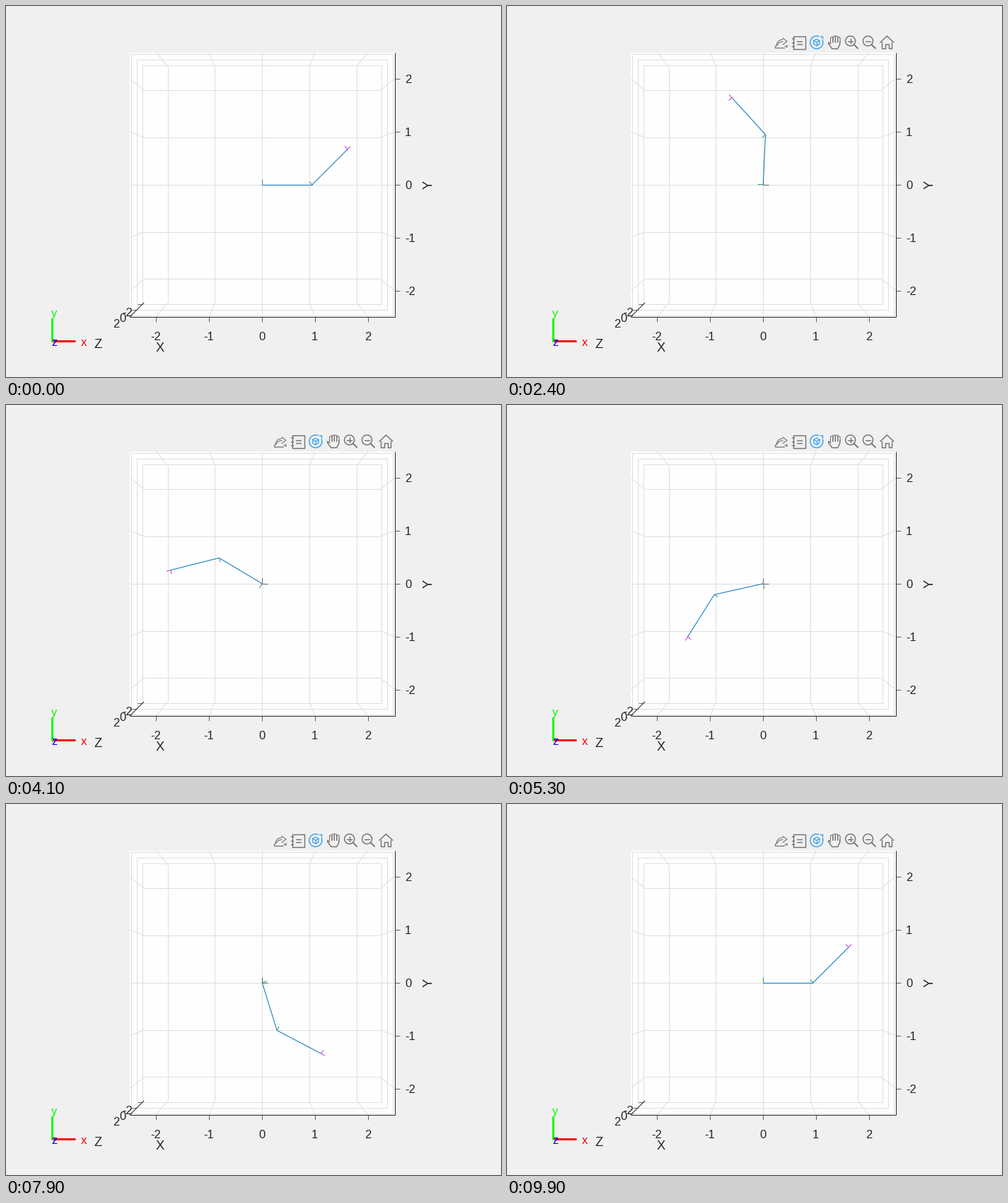
Recreate the animation shown at these times as a matplotlib script. Size 700 px wide and 525 px high, loop 10000 ms.

```python
import numpy as np
import matplotlib.pyplot as plt
from matplotlib.animation import FuncAnimation
from matplotlib.patches import Rectangle

W, H, DPI = 700, 525, 100
FRAMES, INTERVAL = 100, 100
TOOLBAR_START = 17

INK, GRID, BLUE = "#262626", "#dedede", "#0072bd"
GREY, ACTIVE = "#707070", "#2f9ff0"
LEFT, RIGHT, TOP, BOTTOM = 175, 550, 66, 440
CX, CY = 362.2, 252.8
UNIT = 75       # pixels per unit on the front face
LINK = 70.8     # pixels per unit at z = 0
EDGE = 2.5
TICKS = range(-2, 3)

plt.rcParams["font.family"] = "Liberation Sans"
fig = plt.figure(figsize=(W / DPI, H / DPI), dpi=DPI, facecolor="#f0f0f0")
ax = fig.add_axes([0, 0, 1, 1])
ax.set_xlim(0, W)
ax.set_ylim(H, 0)
ax.axis("off")


def line(*pts, color=INK, width=1.0, z=2, cap="butt"):
    xs, ys = zip(*pts)
    return ax.plot(xs, ys, color=color, lw=width * 72 / DPI, zorder=z,
                   solid_capstyle=cap, solid_joinstyle="round")[0]


def label(x, y, s, size=12, color=INK, ha="center", rotation=0):
    ax.text(x, y, s, fontsize=size, color=color, ha=ha, va="baseline",
            rotation=rotation, rotation_mode="anchor", zorder=4)


def project(x, y, z):
    """Perspective view straight down the z axis."""
    s = LINK + 1.6 * z
    return CX + s * x, CY - s * y


def polar(p, angle, r):
    return p[0] + r * np.cos(angle), p[1] - r * np.sin(angle)


def arc(p, r, start=0, stop=360):
    return [polar(p, a, r) for a in np.radians(np.linspace(start, stop, 40))]


def draw_box():
    ax.add_patch(Rectangle((LEFT, TOP), RIGHT - LEFT, BOTTOM - TOP,
                           fc="#fefefe", ec="none", zorder=0))
    e = EDGE
    for t in TICKS:
        line(project(t, -e, -e), project(t, e, -e), color=GRID, z=1)
        line(project(-e, t, -e), project(e, t, -e), color=GRID, z=1)
        for side in (-e, e):
            line(project(t, side, -e), project(t, side, e), color=GRID, z=1)
            line(project(side, t, -e), project(side, t, e), color=GRID, z=1)
    for z in (-2, 0, 2):
        line(*(project(x, y, z) for x, y in
               ((-e, -e), (e, -e), (e, e), (-e, e), (-e, -e))),
             color=GRID, z=1)


def draw_axes():
    line((LEFT, BOTTOM), (RIGHT, BOTTOM))
    line((RIGHT, TOP), (RIGHT, BOTTOM))
    line((LEFT, BOTTOM), project(-EDGE, -EDGE, -EDGE))
    for t in TICKS:
        x, y = CX + UNIT * t, CY - UNIT * t
        line((x, BOTTOM), (x, BOTTOM + 7), width=0.7)
        line((RIGHT, y), (RIGHT + 7, y), width=0.7)
        label(x - 0.7, 473, str(t))
        label(564, y + 6.2, str(t), ha="left")
    for z in (-2, 0, 2):
        x, y = project(-EDGE, -EDGE, z)
        line((x, y), (x - 7, y), width=0.7)
        label(170 - 4.5 * z, 447 + 4 * z, str(z), ha="right")
    label(217.5, 489, "X", 13.2)
    label(603, CY, "Y", 13.2, rotation=90)
    label(130, 484, "Z", 13.2)


def draw_triad():
    line((65, 474), (98, 474), color="#ff0000", width=3)
    line((65, 442), (65, 475), color="#00ff00", width=3)
    label(68.5, 440, "y", color="#00ff00")
    label(109.5, 481, "x", color="#ff0000")
    label(68.5, 481, "z", color="#0000ff")


def draw_toolbar():
    parts = []
    cy = 51.5
    share, note, spin, hand, zoom_in, zoom_out, home = 388 + 24.9 * np.arange(7)

    def stroke(*pts, color=GREY, width=1.4):
        parts.append(line(*pts, color=color, width=width, z=5, cap="round"))

    def box(x0, y0, x1, y1):
        stroke((x0, y0), (x1, y0), (x1, y1), (x0, y1), (x0, y0))

    # share: bent arrow over a tray
    stroke((share + 2, cy - 6), (share + 8, cy - 1.5), (share + 2, cy + 3), width=1.1)
    stroke(*arc((share + 2, cy + 5), 9, 90, 180), width=1.1)
    stroke(*arc((share + 2, cy + 8), 9, 90, 160), width=1.1)
    stroke((share - 9, cy + 4), (share - 9, cy + 7), (share + 4, cy + 7), width=1.2)
    stroke((share + 5, cy + 5), (share + 8, cy + 7), (share + 8, cy + 4), width=1.2)

    # notebook with rings
    box(note - 8, cy - 9, note + 9, cy + 9)
    for dy in (-5.5, 0, 5.5):
        stroke((note - 9.5, cy + dy), (note - 7, cy + dy))
    for dy in (-1.5, 2):
        stroke((note - 3, cy + dy), (note + 4, cy + dy))

    # rotate: ring, arrow head and cube
    c = (spin, cy)
    stroke(*arc(c, 9, 70, 380), color=ACTIVE)
    stroke((spin + 5, cy - 8.5), (spin + 8, cy - 8.5), (spin + 8, cy - 5.5), color=ACTIVE)
    corners = [polar(c, np.radians(30 + 60 * k), 4.7) for k in range(7)]
    stroke(*corners, color=ACTIVE, width=1.2)
    for corner in corners[:6:2]:
        stroke(c, corner, color=ACTIVE, width=1.2)

    # hand: four arched fingers, thumb and palm
    for k in range(4):
        x = hand - 3.5 + 3.4 * k
        tip = cy - 7.5 + 0.8 * (k - 1.5) ** 2
        stroke((x - 1.7, cy), *arc((x, tip), 1.7, 180, 0), (x + 1.7, cy), width=1.1)
    stroke((hand - 5, cy + 2), (hand - 8, cy), (hand - 8, cy + 2), (hand - 3, cy + 9),
           (hand + 5, cy + 9), (hand + 8, cy + 3), (hand + 8, cy - 1))

    # magnifiers
    for x in (zoom_in - 2, zoom_out - 2):
        stroke(*arc((x, cy - 2), 7))
        stroke((x + 5, cy + 3), (x + 10.5, cy + 8.5), width=1.8)
        stroke((x - 3.5, cy - 2), (x + 3.5, cy - 2))
    stroke((zoom_in - 2, cy - 5.5), (zoom_in - 2, cy + 1.5))

    # home
    stroke((home - 9.5, cy), (home, cy - 9), (home + 9.5, cy))
    stroke(*((home + s * dx, cy + dy) for s, dx, dy in
             ((-1, 7, -1), (-1, 7, 8.5), (-1, 2.5, 8.5), (-1, 2.5, 2),
              (1, 2.5, 2), (1, 2.5, 8.5), (1, 7, 8.5), (1, 7, -1))))
    return parts


draw_box()
draw_axes()
draw_triad()
toolbar = draw_toolbar()

base = (CX, CY)
line(base, (CX, CY - 7.5), color="#606060")
line(base, (CX + 7.5, CY), color="#606060")

link1, link2 = (line(base, base, color=BLUE, z=3) for _ in range(2))
base_y, elbow_y = (line(base, base, color="#3f9a48", z=4) for _ in range(2))
tip_x, tip_y = (line(base, base, color="#c83cd2", z=4) for _ in range(2))


def put(artist, p, q):
    artist.set_data(*zip(p, q))


def update(i):
    a = 2 * np.pi * i / (FRAMES - 1)
    b = a + np.pi / 4
    elbow = polar(base, a, LINK)
    tip = polar(elbow, b, LINK)
    put(link1, base, elbow)
    put(link2, elbow, tip)
    put(base_y, base, polar(base, a + np.pi / 2, 7.5))
    put(elbow_y, elbow, polar(elbow, b + np.pi / 2, 6))
    put(tip_x, tip, polar(tip, b, 6))
    put(tip_y, tip, polar(tip, b + np.pi / 2, 6))
    for part in toolbar:
        part.set_visible(i >= TOOLBAR_START)
    return []


anim = FuncAnimation(fig, update, frames=FRAMES, interval=INTERVAL,
                     init_func=lambda: update(0), repeat=True, repeat_delay=0,
                     blit=False)
plt.show()
```
